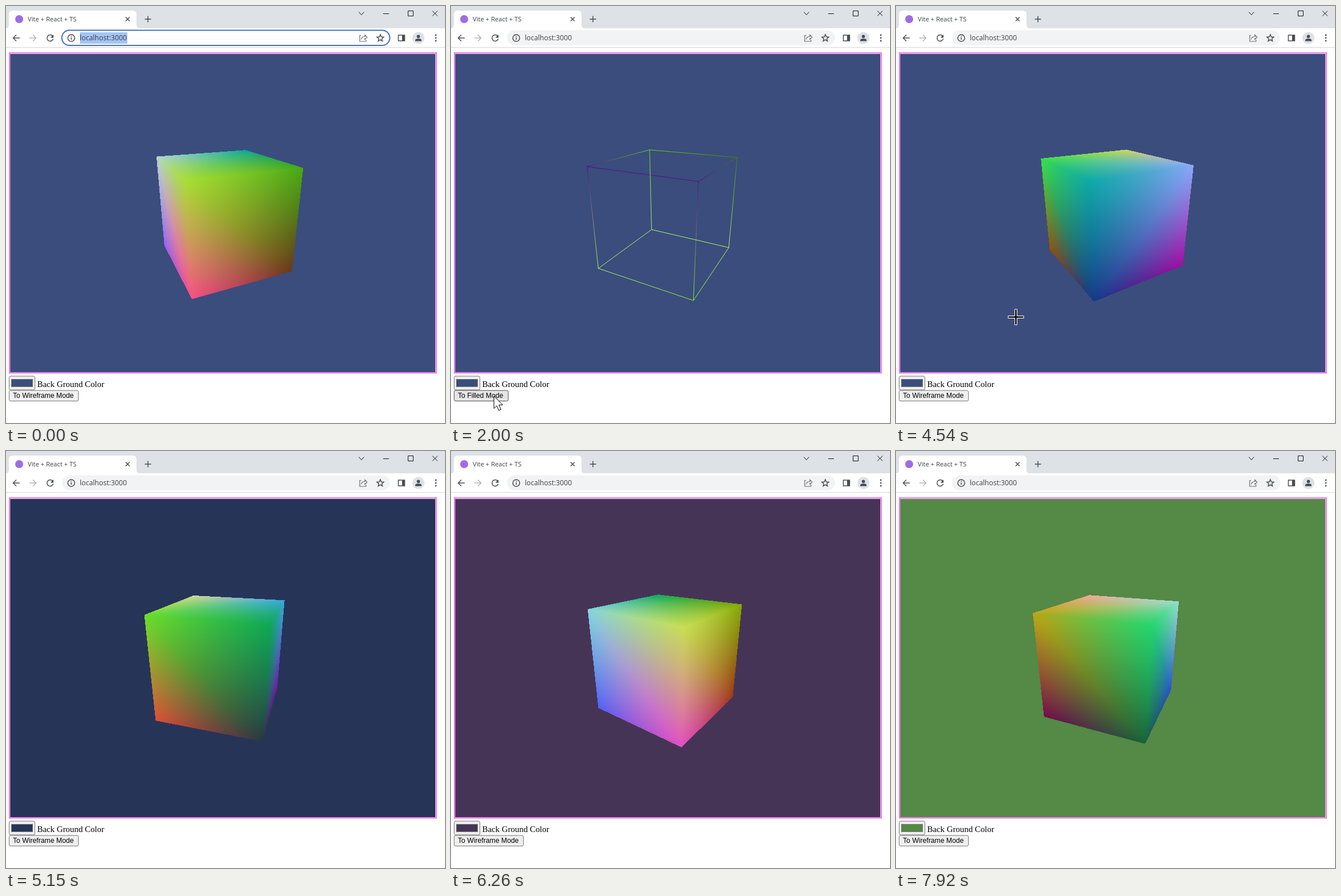
An HTML page with a canvas for the animation above (8 s loop, 767 by 730 pixels).

```html
<!DOCTYPE html>
<html lang="en">
<head>
<meta charset="utf-8">
<title>Rotating cube</title>
<style>
  html, body { margin: 0; width: 100%; height: 100%; overflow: hidden; background: #fff; }
  canvas { position: absolute; left: 7px; top: 84px; }
  svg { position: absolute; left: 0; top: 0; }
  .ui { font-family: "Open Sans", "Noto Sans", sans-serif; fill: #3c4043; }
  .btn { font: 12.2px "Liberation Sans", Arial, sans-serif; }
  .icon { fill: none; stroke: #4a4d51; stroke-width: 1.5; }
  .box { fill: #efefef; stroke: #767676; }
  .box.hover { fill: #e5e5e5; stroke: #4f4f4f; }
</style>
</head>
<body>
<canvas id="view" width="743" height="557"></canvas>
<svg width="767" height="730" viewBox="0 0 767 730">
  <!-- tab strip -->
  <path fill="#dee1e6" d="M0 0H767V39H0Z"/>
  <path fill="#fff" d="M0 39Q5 39 5 33V15Q5 8 12 8H221Q228 8 228 15V33Q228 39 234 39Z"/>
  <circle cx="23" cy="23" r="7" fill="#a06be8"/>
  <text class="ui" x="38" y="27" font-size="11.2">Vite + React + TS</text>
  <path class="icon" stroke="#222" d="M209 19.5l7 7m0-7l-7 7M242.5 23h11M248 17.500v11"/>
  <path class="icon" style="stroke:#111;stroke-width:1" d="M616.500 10.500l4.500 5 4.500-5M659 13.500h10M702.500 8.500h9v9h-9zM745 8.500l9 9m0-9l-9 9"/>
  <!-- toolbar -->
  <path stroke="#d5d7da" d="M0 72.500H767"/>
  <path class="icon" d="M24 56H12.500m5.500-5.500l-5.500 5.500 5.500 5.500"/>
  <path class="icon" style="stroke:#b4b6b9" d="M41 56h11.500m-5.500-5.500l5.500 5.500-5.500 5.500"/>
  <path class="icon" d="M81.500 52.500A5.500 5.500 0 1 0 82.500 57.500"/>
  <path fill="#4a4d51" d="M83 50v5.500h-5.500z"/>
  <rect id="omni" y="42.500" height="26.500" rx="13.250"/>
  <path id="sel" fill="#a4c5f3" d="M129 46h83v20h-83z"/>
  <circle class="icon" cx="114" cy="56" r="6" stroke-width="1.3"/>
  <path class="icon" d="M114 55v4M114 52.300v1.500"/>
  <text class="ui" x="129" y="60.300" font-size="12.2">localhost:3000</text>
  <path class="icon" style="stroke:#6b6e72;stroke-width:1.2" d="M620.500 51.500h-2.500v10.500h11v-3M620.500 58.500q1-5 6.500-5v-3l4 4-4 4v-2.500"/>
  <path class="icon" stroke-width="1.3" d="M654 50l1.700 4 4.300.4-3.300 2.900 1 4.200-3.700-2.300-3.700 2.300 1-4.200-3.300-2.900 4.300-.4z"/>
  <path class="icon" d="M685.500 51h11v10h-11z"/>
  <path fill="#4a4d51" d="M692 51h5v10h-5z"/>
  <circle cx="720.500" cy="56" r="10.500" fill="#dee1e6"/>
  <path fill="#474c55" d="M715 61.500v-1.500q0-3 5.500-3t5.500 3v1.500z"/>
  <circle cx="720.500" cy="53.300" r="2.800" fill="#474c55"/>
  <g fill="#4a4d51"><circle cx="751" cy="51" r="1.400"/><circle cx="751" cy="56" r="1.400"/><circle cx="751" cy="61" r="1.400"/></g>
  <!-- page -->
  <path fill="#ee82ee" fill-rule="evenodd" d="M5 81H753V643.500H5ZM7.500 83.500V641H750.500V83.500Z"/>
  <rect id="pick" class="box" x="5.500" y="648" width="45" height="24" rx="2.500"/>
  <rect id="swatch" x="9.500" y="653.500" width="37" height="13" stroke="#777"/>
  <text x="54.500" y="667" font-family="Liberation Serif, Times New Roman, serif" font-size="14.85">Back Ground Color</text>
  <rect id="mode" class="box" x="5.500" y="673" width="121" height="18.500" rx="2.500"/>
  <text id="label" class="btn" x="12" y="686.300"></text>
  <!-- pointers -->
  <path id="arrow" fill="#fff" stroke="#000" d="M0 0V21.500L5 16.800L8.600 25L12.300 23.300L8.800 15.300H15.500Z"/>
  <g id="cross" fill="none" transform="translate(209.500 544.500)">
    <path stroke="#fff" stroke-width="5" d="M-14 0H14M0-14V14"/>
    <path stroke="#000" stroke-width="2.600" d="M-13 0H13M0-13V13"/>
  </g>
</svg>
<script>
const $ = id => document.getElementById(id);
const W = 743, H = 557, LOOP = 8000;
const ctx = $('view').getContext('2d');
const image = ctx.createImageData(W, H);
const pixels = new Uint32Array(image.data.buffer);

// Key rows: [time, value, ...], linear in between
const TURN = [[0, -66.2], [2000, 62], [3420, 150.9], [4540, 212.4], [5630, 284.2], [7060, 374.2], [7920, 426.9], [8000, 432]];
const BACK = [[4540, 59, 77, 124], [5630, 21, 33, 60], [7060, 132, 75, 121], [7920, 84, 137, 70]];
const MOUSE = [[90, 20, 660], [1040, 60, 665], [1400, 75, 683], [2500, 75, 683], [3200, 20, 655], [3500, 20, 655],
  [3800, 60, 681], [4050, 60, 681], [4300, 25, 658]];
const TO_WIRE = 1500, TO_FILL = 3950, PICKER = 4460, PICKER_END = 4610;

// Vertex index bits: 4 = +x, 2 = +y, 1 = +z
const CORNERS = [...Array(8).keys()].map(i => [i & 4 ? 1 : -1, i & 2 ? 1 : -1, i & 1 ? 1 : -1]);
const unit = v => v.map(c => c / Math.hypot(...v));
const FILL_NORMALS = ['121', '211', '111', '112', '212', '122', '111', '221']
  .map((w, i) => unit(CORNERS[i].map((s, k) => s * w[k])));
const WIRE_NORMALS = [[0, 1, 0], [-.4, .9, 0], [0, -1, 0], [0, -1, 0], [0, 1, 0], [0, 1, 0], [-.7, .7, 0], [-1, 0, 0]];
const FACES = [[4, 5, 7, 6], [4, 6, 2, 0], [7, 3, 2, 6], [3, 7, 5, 1], [2, 3, 1, 0]];

// Camera at (0, 2, 5) looking at the centre, 60 degree field of view
const DIST = Math.hypot(2, 5), TS = 2 / DIST, TC = 5 / DIST, FOCAL = 483;

function keyed(rows, t) {
  const j = rows.findIndex(r => r[0] > t);
  if (j < 0) return rows[rows.length - 1].slice(1);
  if (j === 0) return rows[0].slice(1);
  const a = rows[j - 1], b = rows[j], k = (t - a[0]) / (b[0] - a[0]);
  return a.slice(1).map((v, i) => v + (b[i + 1] - v) * k);
}

function project([x, y, z], s, c) {
  const wx = x * c + z * s, wz = z * c - x * s;
  const depth = DIST - y * TS - wz * TC;
  return { x: 372 + FOCAL * wx / depth, y: 278 - FOCAL * (y * TC - wz * TS) / depth, w: 1 / depth };
}

// Normal times the transposed model-view matrix, mapped to 0..255
function shade([x, y, z], s, c) {
  const ty = y * TC + z * TS, tz = z * TC - y * TS;
  return [x * c - tz * s, ty, x * s + tz * c].map(v => 127.5 + 127.5 * v);
}

const cross = (a, b, x, y) => (b.x - a.x) * (y - a.y) - (b.y - a.y) * (x - a.x);

function triangle(p, q, r) {
  if (cross(p, q, r.x, r.y) <= 0) return;
  const xs = [p.x, q.x, r.x], ys = [p.y, q.y, r.y];
  const x1 = Math.max(...xs), y1 = Math.max(...ys);
  for (let j = Math.floor(Math.min(...ys)); j <= y1; j++) {
    for (let i = Math.floor(Math.min(...xs)); i <= x1; i++) {
      const x = i + .5, y = j + .5;
      let a = cross(q, r, x, y), b = cross(r, p, x, y), c = cross(p, q, x, y);
      if (a < 0 || b < 0 || c < 0) continue;
      a *= p.w; b *= q.w; c *= r.w;
      const sum = a + b + c;
      const mix = k => (a * p.rgb[k] + b * q.rgb[k] + c * r.rgb[k]) / sum;
      pixels[j * W + i] = 0xff000000 | mix(2) << 16 | mix(1) << 8 | mix(0);
    }
  }
}

function line(p, q) {
  const g = ctx.createLinearGradient(p.x, p.y, q.x, q.y);
  g.addColorStop(0, `rgb(${p.rgb})`);
  g.addColorStop(1, `rgb(${q.rgb})`);
  ctx.strokeStyle = g;
  ctx.beginPath();
  ctx.moveTo(p.x, p.y);
  ctx.lineTo(q.x, q.y);
  ctx.stroke();
}

function drawCube(t, wire, back) {
  const angle = keyed(TURN, t)[0] * Math.PI / 180, s = Math.sin(angle), c = Math.cos(angle);
  const normals = wire ? WIRE_NORMALS : FILL_NORMALS;
  const v = CORNERS.map((p, i) => ({ ...project(p, s, c), rgb: shade(normals[i], s, c) }));
  pixels.fill(0xff000000 | back[2] << 16 | back[1] << 8 | back[0]);
  if (!wire) for (const [a, b, d, e] of FACES) {
    triangle(v[a], v[b], v[d]);
    triangle(v[a], v[d], v[e]);
  }
  ctx.putImageData(image, 0, 0);
  if (wire) for (let i = 0; i < 8; i++)
    for (const bit of [1, 2, 4]) if (!(i & bit)) line(v[i], v[i | bit]);
}

const set = (id, attrs) => { for (const k in attrs) $(id).setAttribute(k, attrs[k]); };
const show = (id, on) => set(id, { visibility: on ? 'visible' : 'hidden' });

function draw() {
  const t = performance.now() % LOOP;
  const wire = t >= TO_WIRE && t < TO_FILL, focus = t < TO_WIRE;
  const back = keyed(BACK, t).map(Math.round);
  drawCube(t, wire, back);

  const [mx, my] = keyed(MOUSE, t), pointing = t >= 90 && t < PICKER;
  const width = wire ? 94.5 : 121;
  show('arrow', pointing);
  show('cross', t >= PICKER && t < PICKER_END);
  set('arrow', { transform: `translate(${mx} ${my})` });
  set('pick', { class: pointing && my < 672 && mx < 51 ? 'box hover' : 'box' });
  set('mode', { width, class: pointing && my > 673 && mx < width + 5 ? 'box hover' : 'box' });
  set('swatch', { fill: `rgb(${back})` });
  $('label').textContent = wire ? 'To Filled Mode' : 'To Wireframe Mode';
  show('sel', focus);
  set('omni', focus
    ? { x: 97.5, width: 573, fill: '#fff', stroke: '#4470c0', 'stroke-width': 2 }
    : { x: 98, width: 573, fill: '#f1f3f4', stroke: 'none' });
  requestAnimationFrame(draw);
}
draw();
</script>
</body>
</html>
```
